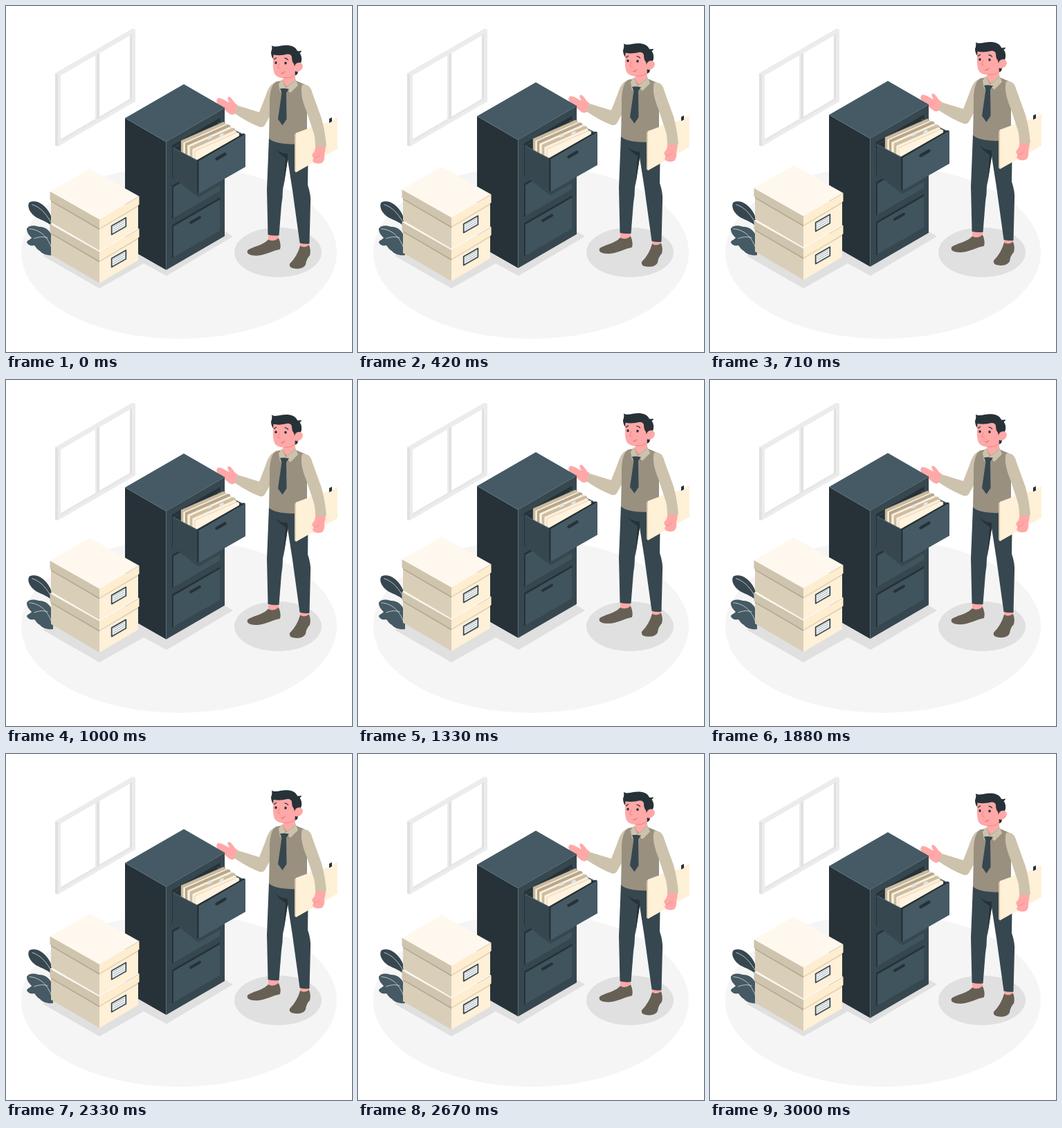
An HTML page that plays this animation: 500 px wide and 500 px high, repeating every 3.04 s.

```html
<!DOCTYPE html>
<html lang="en">
<head>
<meta charset="utf-8">
<title>Filing office</title>
<style>
html, body { margin: 0; width: 100%; height: 100%; overflow: hidden; background: #fff; }
svg { display: block; width: 100%; height: 100%; }
.ink { fill: #263238; }
.navy { fill: #37474f; }
.steel { fill: #455a64; }
.cream { fill: #fff0d8; }
.sand { fill: #d9cfb9; }
.shirt { fill: #cdc2ac; }
.skin { fill: #ffa8a7; }
.shoe { fill: #665f54; }
.line { fill: none; stroke-linecap: round; stroke-linejoin: round; }
</style>
</head>
<body>
<svg viewBox="0 0 500 500">
  <defs>
    <g id="box">
      <path class="sand" d="M65 325L135 366V400L65 359Z"/>
      <path class="cream" d="M135 366L191 333V367L135 400Z"/>
      <path fill="#b5a78f" d="M65 326L135 367V370L65 329Z"/>
      <path fill="#dfd0b4" d="M135 367L191 334V336.500L135 369.500Z"/>
      <path fill="#fff8ee" d="M63.500 314.500L121 281.500L192.500 321.500L135 355Z"/>
      <path fill="#cfc4ad" d="M63.500 314.500L135 355V368L63.500 326.500Z"/>
      <path fill="#ffedd0" d="M135 355L192.500 321.500V333.500L135 368Z"/>
      <path d="M152.700 364.300L173.300 352.500V365L152.700 376.800Z" fill="#fff" stroke="#37474f" stroke-width="1.800" stroke-linejoin="round"/>
      <path class="line" d="M155 365.700L171 356.500M155 368.700L171 359.500M155 371.700L171 362.500M155 374.500L171 365.300" stroke="#98a3a8"/>
    </g>
  </defs>

  <ellipse cx="250" cy="356" rx="228" ry="125" fill="#f5f5f5"/>
  <g fill="#e0e0e0">
    <path d="M53 361L110 328L230 300L280 304L328 333L232 390L199 372L135 408Z"/>
    <ellipse cx="393" cy="356" rx="63" ry="36"/>
  </g>

  <!-- window -->
  <path fill="#ececec" d="M71 97L183 32.500L187 34.500V138L75 203L71 201Z"/>
  <path fill="#e0e0e0" d="M71 97L75 99.300V203L71 201Z"/>
  <path fill="#fff" d="M79 100.500L129 71.600V163.500L79 192.500ZM135 68.200L179.500 42.500V134L135 160Z"/>
  <path fill="#e0e0e0" d="M131.500 70L135 68V162L131.500 164ZM179 42.500L182 40.800V137.500L179 135Z"/>
  <path fill="#e6e6e6" d="M79 192.500L129 163.500L131.500 165L79 196ZM135 160L179.500 134L182 136L135 163Z"/>

  <!-- plant -->
  <path class="navy" d="M33 285C35 281 46 281 54 288C61 294 66 303 67 311V319C60 312 55 311 47 307C38 303 30 293 33 285Z"/>
  <path class="steel" d="M30 322C33 316 42 317 48 319C58 319 66 326 68 338V360C61 361 53 359 49 354C44 351 43 348 41 346C35 347 31 345 30 341C32 338 36 337 37 335C33 331 30 327 30 322Z"/>
  <path class="line" d="M38 287C51 291 59 302 66 314M34 322C49 323 60 333 66 350M41 336C49 333 54 333 60 335" stroke="#dce3e6" stroke-width=".8"/>

  <g id="float">
    <!-- legs and shoes -->
    <path class="skin" d="M379 328H394V340Q386 345 379 339ZM425 340H438V350Q431 353 425 348Z"/>
    <path class="shoe" d="M349 353C353 348 371 346 379 337Q386 341 394 335Q398 344 396 351C386 353 375 359 365 360C354 361 347 358 349 353Z"/>
    <path class="shoe" d="M425 346Q431 350 438 345Q441 353 439 360Q434 365 433 373Q430 380 418 379Q408 378 410 372Q421 361 425 346Z"/>
    <path class="navy" d="M380 190L437 193L436 258Q441 273 440 284L438.500 343Q431 344 424.500 342L414 266L407 221L400 265Q400 276 398 287L394.500 331Q386 332 378.500 330L377 265Z"/>
    <path class="ink" d="M390 206Q397 213 407 213V222L401 262L404 219Q395 214 390 206Z"/>

    <!-- reaching arm -->
    <path class="skin" d="M335 143Q330 140 328 136Q324 130 321 131Q319 133 323 139C317 137 310 131 306 133C302 137 305 141 312 146L320 153Q326 159 331 155Z"/>
    <path class="shirt" d="M391 109C381 112 378 121 375 130L366 153L335 143.500Q332 148 330 154.500Q350 168 366 174Q372 176 375 170L386 150Z"/>

    <!-- torso -->
    <path fill="#999080" d="M390 109L400 107L418 107L432 113L435 150V196Q419 201 398 198Q385 196 380 191L381 145Q380 124 386 113Z"/>
    <path class="skin" d="M401 92L418 96L418 108L408 119L400 108Z"/>
    <path class="shirt" d="M399 105L405 117L418 104L422 114L411 125L404 119L396 124L394 112Z"/>
    <path class="line" d="M400 107L404 118L418 107" stroke="#aa9f8a" stroke-width=".6"/>
    <path class="navy" d="M396 119L402 118.500L409 119.500L405 125L405.500 163L399.500 172L393 163L398.500 125Z"/>

    <!-- head -->
    <path class="ink" d="M384 56.500C387 59 391 58 397 57C408 55 418 57 421 64.500Q424 65 427 64Q427 66 424.500 67.500Q428 72 427 79L425 84L421 98L418 100L416 90L390 74L387 77Q383 73 383 66Q385 62 384 56.500Z"/>
    <path class="skin" d="M386.500 70Q396 72 407 69Q412 69 413 73Q413 80 416 83L418 92L417 101Q412 105 405 104C395 104 388 101 387 94C385 86 386 78 386.500 70Z"/>
    <path class="skin" d="M417 87C418 80 428 79 429 86C429 92 421 97 417 93Z"/>
    <path class="line" d="M402 103Q411 105 417 99M395 83L392.500 89L396 90" stroke="#ee8583" stroke-width="1"/>
    <path class="line" d="M398 97Q401 97 403 94.500" stroke="#bd5b5c" stroke-width=".9"/>
    <path class="line" d="M387.500 76.500L390.500 74.500M403 75Q406 75 407.500 77.500" stroke="#263238" stroke-width="1.300"/>
    <g class="ink"><ellipse cx="390" cy="81.500" rx="1.600" ry="2"/><ellipse cx="404" cy="82" rx="1.700" ry="2"/></g>

    <!-- folder and carrying arm -->
    <path fill="#d9c9a9" d="M417 185L419 183V240L417 238Z"/>
    <path class="cream" d="M419 183L438 176L440 174L464 168L479 160.500V206L419 240Z"/>
    <path class="ink" d="M467 162.500L471 160.500V166.500L467 168.500Z"/>
    <path class="skin" d="M447 199L462 200Q462 208 460 214Q461 222 457 226Q450 229 444 225Q442 222 445 219Q441 217 443 213Q448 209 447 199Z"/>
    <path class="line" d="M445 219Q450 219 453 215" stroke="#ee8583" stroke-width=".8"/>
    <path class="shirt" d="M428 113C438 112 441 118 443 126L456 162Q461 180 463 202Q455 204 447 202Q447 188 443 178L434 151Q424 127 428 113Z"/>

    <!-- cabinet -->
    <path class="steel" d="M257 112.500L316 146.500L231.500 196L172 161.500Z"/>
    <path class="ink" d="M172 161.500L231.500 196V381L172 347Z"/>
    <path class="navy" d="M231.500 195.500L316 146.500V332L231.500 381Z"/>
    <path class="line" d="M172.500 161.500L231.500 195.500L316 146.500M231.500 196V380" stroke="#5b717c" stroke-width=".8"/>
    <path class="ink" d="M240 201L309.500 161V209L240 249ZM240 259L309.500 219V267L240 307ZM240 316L309.500 276V324L240 364Z"/>
    <path fill="#40545e" d="M242 261L309.500 222V267L242 306ZM242 318L309.500 279V324L242 363Z"/>
    <path class="navy" d="M242 204L250 199V244L242 248ZM251 255L278 271L309.500 253V258L278 276Z"/>
    <path class="line" d="M267 312.500L280 305" stroke="#263238" stroke-width="4"/>

    <!-- open drawer -->
    <path class="ink" d="M242 205L305 168L344 186L278 224Z"/>
    <path class="line" d="M306 168L344 186" stroke="#455a64" stroke-width="1.500"/>
    <g id="files" stroke="#b3a38a" stroke-width=".4"></g>
    <path class="navy" d="M241 204L278 223V271L241 249Z"/>
    <path class="line" d="M242 204.500L277 223" stroke="#5b717c" stroke-width=".8"/>
    <path class="ink" d="M276 222L343.500 183.500L346 185L279 224V271L276 269.500Z"/>
    <path class="steel" d="M278.500 223.500L346 185V232L278.500 270.500Z"/>
    <path class="line" d="M304.500 220.500L316.500 213.500" stroke="#263238" stroke-width="4.400"/>

    <use href="#box"/>
    <use href="#box" y="-47"/>
  </g>
</svg>
<script>
const LOOP = 3040, CYCLE = 3000, LIFT = 10, REST = 0.5;
const float = document.getElementById('float');

// left x, top y, run to the right, colour; back sheet first
const sheets = [
  [253, 194, 64, '#c9bba1'], [256, 197, 64, '#fff0d8'],
  [259, 198, 65, '#b3a78f'], [262, 201, 64, '#fff0d8'],
  [266, 203, 65, '#cdbfa5'], [269, 206, 64, '#fff0d8'],
  [273, 209, 64, '#fff3df']
];
const tab = (x, y) =>
  `<path d="M${x} ${y}l1-5 5-2 1 4z" fill="#e4e4e4" stroke="none"/>`;
document.getElementById('files').innerHTML = sheets.map(([x, y, run, fill]) => {
  const rise = run * .42;
  return `<path fill="${fill}" d="M${x} ${y}l${run - 3} ${-rise} 3 1.5v24l${-run} ${rise}z"/>`;
}).join('') + tab(291, 193) + tab(308, 190);

function draw(now) {
  const phase = Math.min(now % LOOP, CYCLE) / CYCLE;
  const y = REST - LIFT * (1 - Math.abs(1 - 2 * phase));
  float.setAttribute('transform', `translate(0 ${y.toFixed(2)})`);
}
const start = performance.now();
function tick() {
  draw(performance.now() - start);
  requestAnimationFrame(tick);
}
tick();
</script>
</body>
</html>
```
